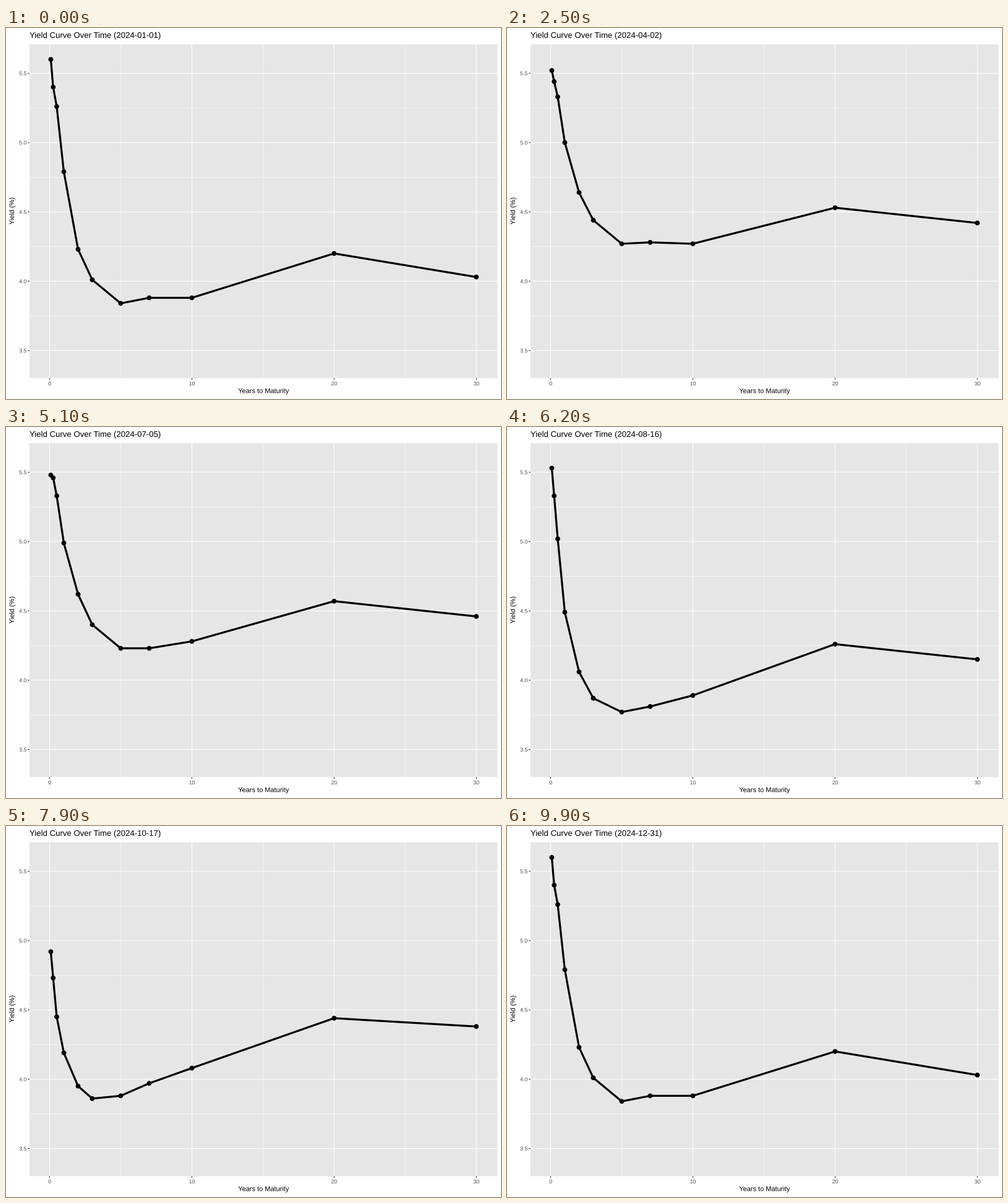
These frames come from a looping animation (800x600 px, 10000 ms). A matplotlib script:

```python
import numpy as np
import matplotlib.pyplot as plt
from matplotlib.animation import FuncAnimation
from matplotlib.patches import Circle, PathPatch, Rectangle
from matplotlib.textpath import TextPath
from matplotlib.transforms import Affine2D

W, H, DPI = 800, 600, 100
FRAMES, INTERVAL = 100, 100
LEFT, RIGHT, TOP, BOTTOM = 38, 794.5, 26.25, 566.25
X_RANGE = (-1.4125, 31.4958)
Y_RANGE = (3.3005, 5.7095)
FONT = {"family": "Liberation Sans"}

YEARS = np.array([1 / 12, 0.25, 0.5, 1, 2, 3, 5, 7, 10, 20, 30])

# Key curves by step; the steps between are interpolated
CURVES = {
    0: [5.60, 5.40, 5.26, 4.79, 4.23, 4.01, 3.84, 3.88, 3.88, 4.20, 4.03],
    16: [5.53, 5.45, 5.30, 5.01, 4.64, 4.43, 4.26, 4.28, 4.25, 4.51, 4.38],
    34: [5.51, 5.45, 5.42, 5.12, 4.82, 4.64, 4.48, 4.48, 4.49, 4.73, 4.64],
    51: [5.48, 5.46, 5.33, 4.99, 4.62, 4.40, 4.23, 4.23, 4.28, 4.57, 4.46],
    62: [5.53, 5.33, 5.02, 4.49, 4.06, 3.87, 3.77, 3.81, 3.89, 4.26, 4.15],
    79: [4.92, 4.73, 4.45, 4.19, 3.95, 3.86, 3.88, 3.97, 4.08, 4.44, 4.38],
    98: [4.44, 4.31, 4.29, 4.20, 4.31, 4.36, 4.45, 4.53, 4.62, 4.89, 4.82],
}

# Turning points of the market's swings around the key curves
SWINGS = {
    0: 0, 5: 0.15, 8: -0.07, 13: 0.12, 16: 0, 18: -0.19, 21: 0, 24: -0.16,
    30: 0.21, 33: 0.15, 34: 0, 40: 0.12, 42: -0.06, 45: -0.15, 49: 0.18,
    51: 0, 55: 0.12, 59: -0.10, 62: 0, 70: -0.36, 77: 0.03, 79: 0,
    84: 0.20, 87: 0.10, 91: -0.23, 98: 0,
}

# Swings barely touch the short end and fade slightly towards the long end
FOLLOW = 1.05 * YEARS**2 / (YEARS**2 + 0.7) * (1 - 0.005 * YEARS)


def yields(step):
    step %= FRAMES - 1  # the last step wraps to the first curve
    curve = [np.interp(step, list(CURVES), ys) for ys in zip(*CURVES.values())]
    swing = np.interp(step, list(SWINGS), list(SWINGS.values()))
    return np.round(curve + FOLLOW * swing, 2)


def day(step):
    return np.busday_offset("2024-01-01", int(step * 2.64 + 0.35))


def px(x):
    return LEFT + (x - X_RANGE[0]) / (X_RANGE[1] - X_RANGE[0]) * (RIGHT - LEFT)


def py(y):
    return BOTTOM - (y - Y_RANGE[0]) / (Y_RANGE[1] - Y_RANGE[0]) * (BOTTOM - TOP)


def pt(pixels):
    return pixels * 72 / DPI


fig = plt.figure(figsize=(W / DPI, H / DPI), dpi=DPI, facecolor="white")
ax = fig.add_axes([0, 0, 1, 1])
ax.set_xlim(0, W)
ax.set_ylim(H, 0)
ax.axis("off")


def segment(xs, ys, color, width, z=2):
    ax.plot(xs, ys, color=color, lw=pt(width), solid_capstyle="butt",
            snap=False, zorder=z)


def glyphs(x, y, text, size, align=0.5, angle=0):
    """Outline of a text on the baseline y; align 0 is left, 1 is right."""
    path = TextPath((0, 0), text, size=size, prop=FONT)
    shift = align * path.get_extents().x1
    place = Affine2D().translate(-shift, 0).scale(1, -1)
    return place.rotate_deg(-angle).translate(x, y).transform_path(path)


def label(*args, color="black", **kw):
    return ax.add_patch(PathPatch(glyphs(*args, **kw), fc=color, ec="none",
                                  snap=False, zorder=5))


ax.add_patch(Rectangle((LEFT, TOP), RIGHT - LEFT, BOTTOM - TOP,
                       fc="#e6e6e6", ec="none", snap=False, zorder=0))

for x in range(0, 31, 5):
    major = x % 10 == 0
    segment([px(x)] * 2, [TOP, BOTTOM], "white", 1.07 if major else 0.53)
    if major:
        segment([px(x)] * 2, [BOTTOM, BOTTOM + 2.75], "#333333", 1.07)
        label(px(x), 578, str(x), 8.8, color="#4d4d4d")
for y in np.arange(3.5, 5.6, 0.25):
    major = y % 0.5 == 0
    segment([LEFT, RIGHT], [py(y)] * 2, "white", 1.07 if major else 0.53)
    if major:
        segment([LEFT - 2.75, LEFT], [py(y)] * 2, "#333333", 1.07)
        label(33, py(y) + 3.2, f"{y:.1f}", 8.8, align=1, color="#4d4d4d")

label((LEFT + RIGHT) / 2, 590.4, "Years to Maturity", 11)
label(13, (TOP + BOTTOM) / 2, "Yield (%)", 11, angle=90)
title = label(LEFT, 16, "Yield Curve", 13.2, align=0)

xs = px(YEARS)
line, = ax.plot([], [], color="black", lw=pt(3.2), solid_capstyle="butt",
                solid_joinstyle="round", snap=False, zorder=3)
dots = [ax.add_patch(Circle((x, 0), 3.91, fc="black", ec="none", zorder=4))
        for x in xs]


def update(step):
    ys = py(yields(step))
    line.set_data(xs, ys)
    for dot, x, y in zip(dots, xs, ys):
        dot.center = x, y
    text = f"Yield Curve Over Time ({day(step)})"
    title.set_path(glyphs(LEFT, 16, text, 13.2, align=0))
    return [line, title, *dots]


anim = FuncAnimation(fig, update, frames=FRAMES, interval=INTERVAL,
                     repeat=True, repeat_delay=0, blit=False)
plt.show()
```
